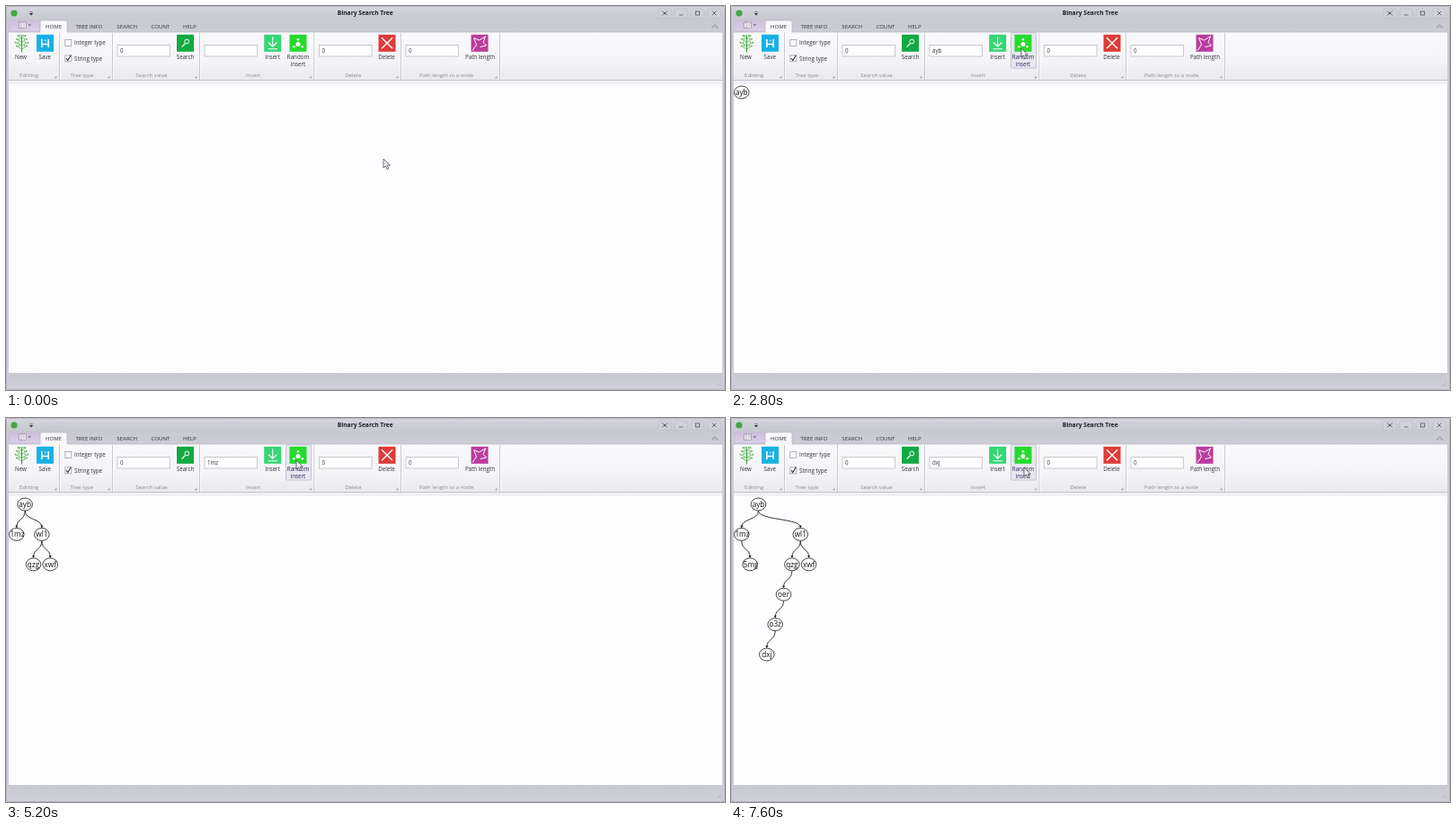
An HTML page for the animation above (8 s loop, 800 px wide and 427 px high).

```html
<!DOCTYPE html>
<html lang="en">
<head>
<meta charset="utf-8">
<title>Binary Search Tree</title>
<style>
html, body { margin: 0; width: 100%; height: 100%; overflow: hidden; background: #c9c9d1; }
svg { display: block; }
#stage { width: 100%; height: 100%; }
text { font-family: "Open Sans", "Noto Sans", sans-serif; font-size: 6.2px; fill: #30303a; }
.mid { text-anchor: middle; }
.node { font-size: 8.2px; fill: #111; }
</style>
</head>
<body>
<svg id="stage" viewBox="0 0 800 427" xmlns="http://www.w3.org/2000/svg">
  <defs>
    <linearGradient id="bar" x2="0" y2="1">
      <stop offset="0" stop-color="#d6d6dd"/><stop offset=".45" stop-color="#c8c8d0"/><stop offset="1" stop-color="#cdcdd5"/>
    </linearGradient>
    <linearGradient id="ribbon" x2="0" y2="1">
      <stop offset="0" stop-color="#fafafc"/><stop offset=".6" stop-color="#f4f4f7"/><stop offset="1" stop-color="#e9e9ee"/>
    </linearGradient>
    <linearGradient id="file" x2="0" y2="1">
      <stop offset="0" stop-color="#cdbfdb"/><stop offset="1" stop-color="#dccfe9"/>
    </linearGradient>
    <linearGradient id="status" x2="0" y2="1">
      <stop offset="0" stop-color="#c8c8d0"/><stop offset="1" stop-color="#d0d0d8"/>
    </linearGradient>
  </defs>
  <g id="chrome"></g>
  <g id="tree"></g>
  <path id="cursor" d="M0 0V10L2.4 7.9L4.1 11.6L5.8 10.8L4.2 7.2H7.3Z" fill="#f4f4f8" stroke="#4a4a55" stroke-width=".8" stroke-linejoin="round"/>
</svg>
<script>
const NS = 'http://www.w3.org/2000/svg';
const LOOP = 8000, STEP = 100;
const $ = id => document.getElementById(id);
const chrome = $('chrome'), treeLayer = $('tree'), cursor = $('cursor');

function add(parent, tag, attrs, content) {
  const el = document.createElementNS(NS, tag);
  for (const k in attrs) el.setAttribute(k, attrs[k]);
  if (content !== undefined) el.textContent = content;
  parent.appendChild(el);
  return el;
}
const rect = (x, y, width, height, fill, more) => add(chrome, 'rect', { x, y, width, height, fill, ...more });
const label = (x, y, str, more) => add(chrome, 'text', { x, y, ...more }, str);
const centred = (x, y, str, more) => label(x, y, str, { class: 'mid', ...more });
const line = (d, stroke, width = 1, more) =>
  add(chrome, 'path', { d, stroke, 'stroke-width': width, fill: 'none', ...more });
const dot = (cx, cy, r, fill) => add(chrome, 'circle', { cx, cy, r, fill });
const tile = (cx, fill) => rect(cx - 9.5, 31.8, 19, 19, fill);

function drawWindow() {
  rect(0, 0, 800, 427, '#cfcad8');
  rect(0, 0, 800, 30, 'url(#bar)');
  rect(.5, .5, 799, 426, 'none', { stroke: '#b7b5c1', rx: 2 });
  dot(9, 8, 3.6, '#43a63f');
  line('M26.2 6.6H29.8', '#4a4a54', .6);
  add(chrome, 'path', { d: 'M25.8 8H30.2L28 10.4Z', fill: '#33333b' });
  centred(399.7, 10.3, 'Binary Search Tree', { style: 'font-size:6.7px;font-weight:700;fill:#1d1d25' });

  for (const x of [733, 751, 769.5, 788])
    rect(x - 7, 3, 14, 10, '#d1d1d9', { stroke: '#bdbdc7', 'stroke-width': .6, rx: 1.5 });
  line('M730 5.5l1.5 1.5M736 5.5l-1.5 1.5M730 10.5l1.5 -1.5M736 10.5l-1.5 -1.5M749 10H753.5M785.8 5.8l4.4 4.4M790.2 5.8l-4.4 4.4', '#5c5c67', .9);
  rect(731.7, 6.9, 2.6, 2.3, '#5c5c67');
  rect(767.3, 6, 4.4, 4, 'none', { stroke: '#5c5c67', 'stroke-width': .9 });
  line('M785.6 24.4V23.4L788.6 20.4L791.6 23.4V24.4L788.6 22.4Z', '#85858f', .6);

  rect(4, 16, 34, 12, 'url(#file)', { stroke: '#c3b6d0', 'stroke-width': .6, rx: 1 });
  rect(14.5, 18, 8, 6.6, '#f3eff8', { stroke: '#857c92', 'stroke-width': .6 });
  line('M17 18V24.6M19 20H21M19 22H21', '#857c92', .6);
  add(chrome, 'path', { d: 'M24.4 20H28.4L26.4 23Z', fill: '#91879f' });

  rect(3, 29, 794, 54, 'url(#ribbon)');
  line('M3 29H38V18Q38 16 40 16H66Q68 16 68 18V29H797', '#b8b8c2', .8, { fill: '#f8f8fb' });
  rect(38.5, 28.4, 29, 1.4, '#f8f8fb');
  [['HOME', 53], ['TREE INFO', 92.3], ['SEARCH', 134.7], ['COUNT', 172], ['HELP', 204.3]]
    .forEach(([s, x]) => centred(x, 25, s, { style: 'font-size:6.1px' }));

  rect(3, 82, 794, 1, '#c3c3cc');
  rect(3, 83, 794, 4, '#f1f1f5');
  rect(3, 87, 794, 321, '#fdfcfe');
  rect(3, 408, 794, 18, 'url(#status)');
  line('M791 423l5 -5M794 423l2 -2', '#ababb6', .7);
}

function drawGroups() {
  [['Editting', 25.7, 59.5], ['Tree type', 84.5, 118.5], ['Search value', 162, 215.5],
   ['Insert', 275, 343], ['Delete', 386.3, 439.5], ['Path length to a node', 490, 549.5]]
    .forEach(([s, x, end]) => {
      line(`M${end} 30V82`, '#c3c3cc', .9);
      line(`M${end + 1} 30V82`, '#fff', .8);
      centred(x, 79.2, s, { style: 'font-size:6px;fill:#888894' });
      add(chrome, 'path', { d: `M${end - 3.2} 77.8V80.3H${end - 5.7}Z`, fill: '#9a9aa5' });
    });
}

function drawField(x, str) {
  rect(x, 43.5, 58.5, 12.5, '#fff', { stroke: '#bcbcc5', 'stroke-width': .8 });
  return label(x + 3, 52.2, str);
}

function drawTreeIcon() {
  const green = '#4db548';
  line('M17.5 51.5V33', '#3c9a38', 1.1);
  for (let i = 0; i < 4; i++) {
    const y = 48 - i * 3.8, w = 7 - Math.abs(i - 1) * 1.5;
    line(`M17.5 ${y}l${w} -3.6M17.5 ${y}l${-w} -3.6`, green, .8);
    for (const s of [-1, 1]) {
      dot(17.5 + s * w, y - 3.6, .9, green);
      dot(17.5 + s * w * .55, y - 3.8, .8, green);
    }
  }
  dot(17.5, 32.8, .9, green);
}

function drawIcons() {
  drawTreeIcon();
  tile(43.5, '#18b1e3');
  line('M39.8 37V46M47.2 37V46M39.8 42.5H47.2', '#fff', 1.6);
  line('M43.8 37.5V39.5', '#fff', 1);

  tile(199.5, '#12aa42');
  line('M199.4 41.6L195.6 45.6', '#fff', 1.3);
  add(chrome, 'circle', { cx: 201.2, cy: 39.5, r: 2.4, fill: 'none', stroke: '#fff', 'stroke-width': 1 });

  tile(296.7, '#36d675');
  line('M296.7 34.3V45M292 40.5L296.7 45.2L301.4 40.5M291.5 47.8H302', '#fff', 1.1);

  tile(325, '#25dc2c');
  dot(325, 42.4, 2.5, '#fff');
  for (const a of [-90, 30, 150])
    dot(325 + 5.4 * Math.cos(a * Math.PI / 180), 42.6 + 5.4 * Math.sin(a * Math.PI / 180), 1.3, '#fff');

  tile(424, '#de3c38');
  line('M418 35.3L430 47.3M430 35.3L418 47.3', '#fff', 1.4);

  tile(527, '#bb3c9d');
  line('M519 49.5L523.5 43L520.5 35.5L526.5 38L533.5 33.8L531 40.5L534.5 44L527.5 45.5', '#fff', 1);

  [['New', 16.5], ['Save', 43.3], ['Search', 199.5], ['Insert', 296.5], ['Delete', 423.5], ['Path length', 527.5]]
    .forEach(([s, x]) => centred(x, 59.4, s));
}

function checkbox(y, str) {
  label(76, y + 2.3, str);
  return rect(65.8, y - 3.5, 7, 7, '#fbfbfd', { stroke: '#9d9da8', 'stroke-width': .8 });
}

drawWindow();
drawGroups();
const hover = rect(311.5, 29.5, 28, 39.5, '#e8e7f0', { 'stroke-width': .9, rx: 1 });
checkbox(41, 'Integer type');
const stringBox = checkbox(58.3, 'String type');
line('M67 58L68.8 60.6L72.2 54.8', '#2e2e38', 1.1);
drawField(124, '0');
const valueText = drawField(221, '');
drawField(348.5, '0');
drawField(445, '0');
drawIcons();
const randomText = [centred(325, 59.4, 'Random'), centred(325, 66.8, 'insert')];

// press time, insert time, value
const clicks = [
  [2600, 2800, 'ayb'], [3400, 3500, 'wl1'], [4000, 4100, 'qzg'],
  [4500, 4600, 'xwf'], [5000, 5100, '1mz'], [5500, 5600, '5mg'],
  [6200, 6300, 'oer'], [6500, 6700, 'o3z'], [7300, 7400, 'dxj']
];

// time, tip x, tip y
const path = [
  [0, 420, 170], [300, 420, 170], [900, 18, 28], [1200, 68, 58],
  [1700, 372, 88], [2100, 304, 52], [2200, 323, 47], [5600, 323, 47],
  [6100, 331, 54], [6500, 331, 54], [6900, 326, 55], [LOOP, 326, 55]
];

function cursorAt(t) {
  const i = path.findIndex(p => p[0] > t);
  const [t0, x0, y0] = path[i - 1], [t1, x1, y1] = path[i];
  const u = (t - t0) / (t1 - t0), e = u * u * (3 - 2 * u);
  return [x0 + (x1 - x0) * e, y0 + (y1 - y0) * e];
}

// In-order rank gives the column, depth gives the row.
function layout(keys) {
  const sorted = [...keys].sort(), nodes = {};
  keys.forEach((key, i) => {
    let parent = null, depth = 0;
    if (i) {
      let at = nodes[keys[0]];
      while (at) {
        parent = at;
        at = nodes[at[key < at.key ? 'left' : 'right']];
      }
      parent[key < parent.key ? 'left' : 'right'] = key;
      depth = parent.depth + 1;
    }
    nodes[key] = { key, parent, depth, x: 11.8 + 9.35 * sorted.indexOf(key), y: 96 + 33.4 * depth };
  });
  return Object.values(nodes);
}

function drawEdge({ x, y, parent }) {
  const y0 = parent.y + 7, y1 = y - 7;
  add(treeLayer, 'path', {
    d: `M${parent.x} ${y0}C${parent.x} ${y0 + 11} ${x} ${y1 - 11} ${x} ${y1 - 1}`,
    fill: 'none', stroke: '#222', 'stroke-width': .9
  });
  add(treeLayer, 'path', { d: `M${x - 1.5} ${y1 - 2.8}H${x + 1.5}L${x} ${y1}Z`, fill: '#222' });
}

function drawNode({ key, x, y }) {
  add(treeLayer, 'ellipse', { cx: x, cy: y, rx: 8.3, ry: 7, fill: '#fff', stroke: '#333', 'stroke-width': .9 });
  const box = add(treeLayer, 'svg', { x: x - 8.5, y: y - 8, width: 17, height: 16, overflow: 'hidden' });
  const text = add(box, 'text', { class: 'node', y: 10.8 }, key);
  text.setAttribute('x', 8.5 - Math.min(text.getComputedTextLength() / 2, 7.4));
}

let shown = -1;
function drawTree(count) {
  if (count === shown) return;
  shown = count;
  treeLayer.replaceChildren();
  const nodes = layout(clicks.slice(0, count).map(c => c[2]));
  nodes.filter(n => n.parent).forEach(drawEdge);
  nodes.forEach(drawNode);
  valueText.textContent = count ? clicks[count - 1][2] : '';
}

function render(time) {
  const t = Math.floor(time % LOOP / STEP) * STEP;
  const [x, y] = cursorAt(t);
  cursor.setAttribute('transform', `translate(${x} ${y})`);

  const pressed = clicks.some(([down, up]) => t >= down && t < up);
  hover.setAttribute('opacity', Math.min(1, Math.max(0, (t - 2200) / 200)));
  hover.setAttribute('fill', pressed ? '#c6c6cf' : '#e8e7f0');
  hover.setAttribute('stroke', pressed ? '#85858f' : '#c2bfd3');
  randomText.forEach(el => { el.style.fill = t >= 2200 ? '#29245c' : ''; });
  stringBox.setAttribute('fill', t === 1200 ? '#d9d4ee' : '#fbfbfd');

  drawTree(clicks.filter(c => t >= c[1]).length);
}

const start = performance.now();
function tick() {
  render(performance.now() - start);
  requestAnimationFrame(tick);
}
tick();
</script>
</body>
</html>
```
